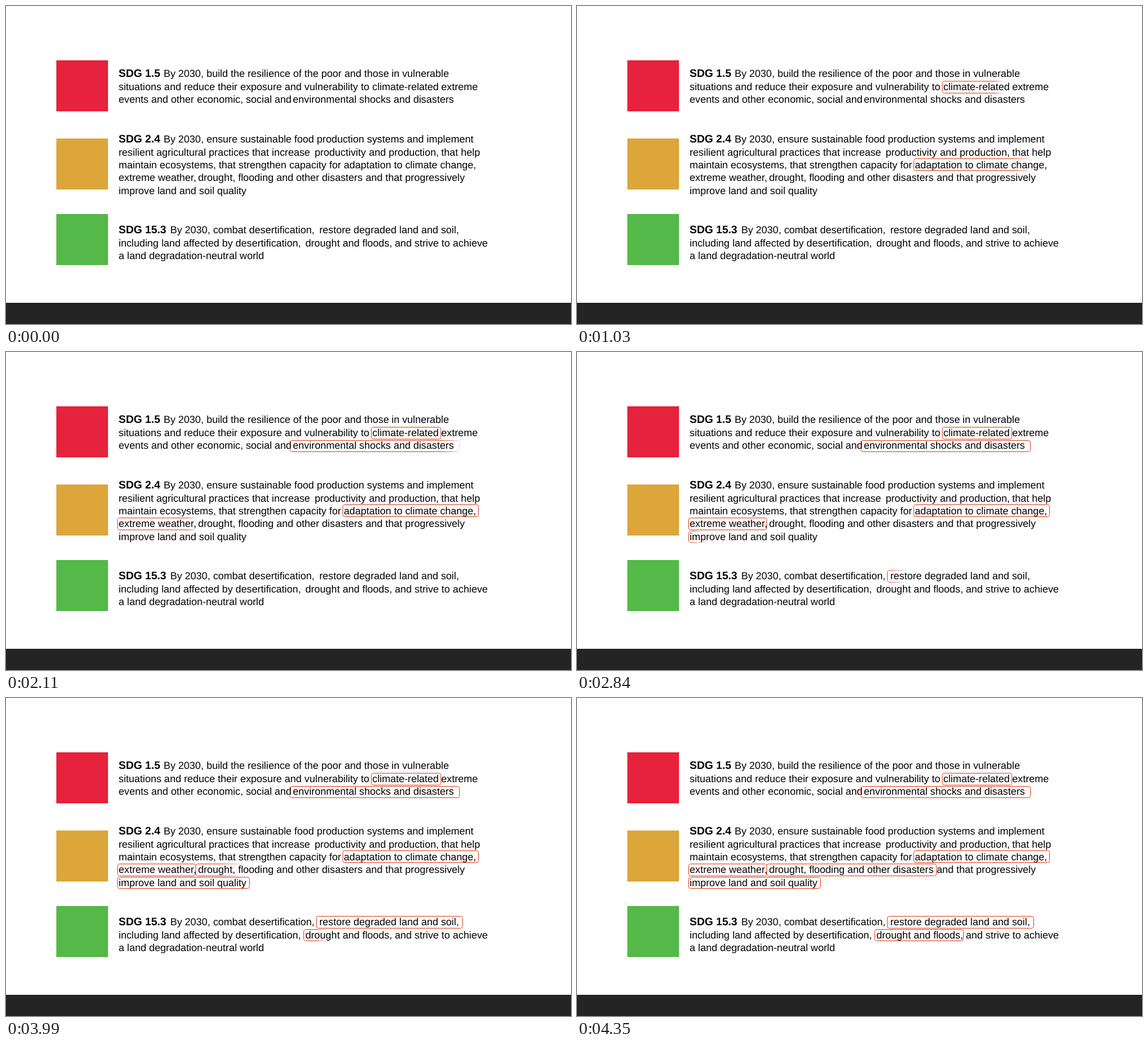
An HTML page that plays this animation: 853x480 px, repeating every 4880 ms.

```html
<!DOCTYPE html>
<html lang="en">
<head>
<meta charset="utf-8">
<title>Climate resilience targets</title>
<style>
  html, body { margin: 0; width: 100%; height: 100%; overflow: hidden; background: #fff; }
  #stage { position: relative; width: 853px; height: 480px; overflow: hidden; background: #fff; }
  svg { position: absolute; left: 0; top: 0; }
  text { font: 15.3px "Liberation Sans", Arial, sans-serif; fill: #000; text-rendering: geometricPrecision; }
  text.code { font-size: 16.4px; font-weight: bold; }
  .box { position: absolute; box-sizing: border-box; border: 1px solid #e9512e; border-radius: 3.5px; visibility: hidden; }
</style>
</head>
<body>
<div id="stage">
  <svg id="page" width="853" height="480" viewBox="0 0 853 480">
    <rect x="76" y="82" width="78" height="77" fill="#e6223c"/>
    <rect x="76" y="200" width="78" height="77" fill="#dda63a"/>
    <rect x="76" y="314" width="78" height="77" fill="#54b948"/>
    <rect y="448" width="853" height="32" fill="#242424"/>
  </svg>
</div>
<script>
const LOOP = 4880, STEP = 60, LAST = 7;
const SOFT = 0.14, ADVANCE = 0.148;

const stage = document.getElementById('stage');
const page = document.getElementById('page');

// baseline, then pairs of x and phrase
const lines = [
  [107, 238, 'By 2030, build the resilience of the poor and those', 582, 'in vulnerable'],
  [127, 170, 'situations and reduce their exposure and vulnerability to', 553, 'climate-related', 657, 'extreme'],
  [146, 170, 'events and other economic, social and', 433, 'environmental shocks and disasters'],
  [206, 238, 'By 2030, ensure sustainable food production systems and implement'],
  [226, 170, 'resilient agricultural practices that increase', 466, 'productivity', 548, 'and production,', 657, 'that help'],
  [245, 170, 'maintain ecosystems, that strengthen capacity for', 510, 'adaptation to climate change,'],
  [264, 170, 'extreme weather,', 290, 'drought, flooding and other disasters', 543, 'and that progressively'],
  [284, 170, 'improve land and soil quality'],
  [343, 248, 'By 2030, combat desertification,', 473, 'restore degraded land and soil,'],
  [363, 170, 'including land affected by desertification,', 452, 'drought and floods,', 587, 'and strive to achieve'],
  [382, 170, 'a land degradation-neutral world']
];

// start time, then x, y, width, height
const boxes = [
  [730, 551, 113, 106, 19],
  [730, 508, 230, 206, 19],
  [1750, 428, 133, 257, 18],
  [1750, 168, 250, 119, 19],
  [2840, 168, 270, 200, 18],
  [2840, 468, 329, 222, 19],
  [3930, 286, 250, 257, 19],
  [3930, 449, 349, 135, 18]
];

function addText(x, y, str, cls) {
  const t = document.createElementNS('http://www.w3.org/2000/svg', 'text');
  t.setAttribute('x', x);
  t.setAttribute('y', y);
  if (cls) t.setAttribute('class', cls);
  t.textContent = str;
  page.append(t);
}

function addBox([start, x, y, w, h]) {
  const el = document.createElement('div');
  el.className = 'box';
  Object.assign(el.style, { left: x + 'px', top: y + 'px', width: w + 'px', height: h + 'px' });
  stage.append(el);
  return { el, start, step: null };
}

// soft-edged wipe from the left, advancing in equal steps
function wipe(box, time) {
  const step = Math.max(-1, Math.min(LAST, Math.floor((time - box.start) / STEP)));
  if (step === box.step) return;
  box.step = step;
  const edge = SOFT + ADVANCE * step;
  const mask = step >= LAST ? 'none' :
    `linear-gradient(90deg, #000 ${(edge - SOFT) * 100}%, transparent ${edge * 100}%)`;
  box.el.style.visibility = step < 0 ? 'hidden' : 'visible';
  box.el.style.webkitMaskImage = mask;
  box.el.style.maskImage = mask;
}

addText(170, 107, 'SDG 1.5', 'code');
addText(170, 206, 'SDG 2.4', 'code');
addText(170, 343, 'SDG 15.3', 'code');
for (const [y, ...parts] of lines)
  for (let i = 0; i < parts.length; i += 2) addText(parts[i], y, parts[i + 1]);

const marks = boxes.map(addBox);
const origin = performance.now();

function draw() {
  const time = (performance.now() - origin) % LOOP;
  for (const box of marks) wipe(box, time);
  requestAnimationFrame(draw);
}
draw();
</script>
</body>
</html>
```
